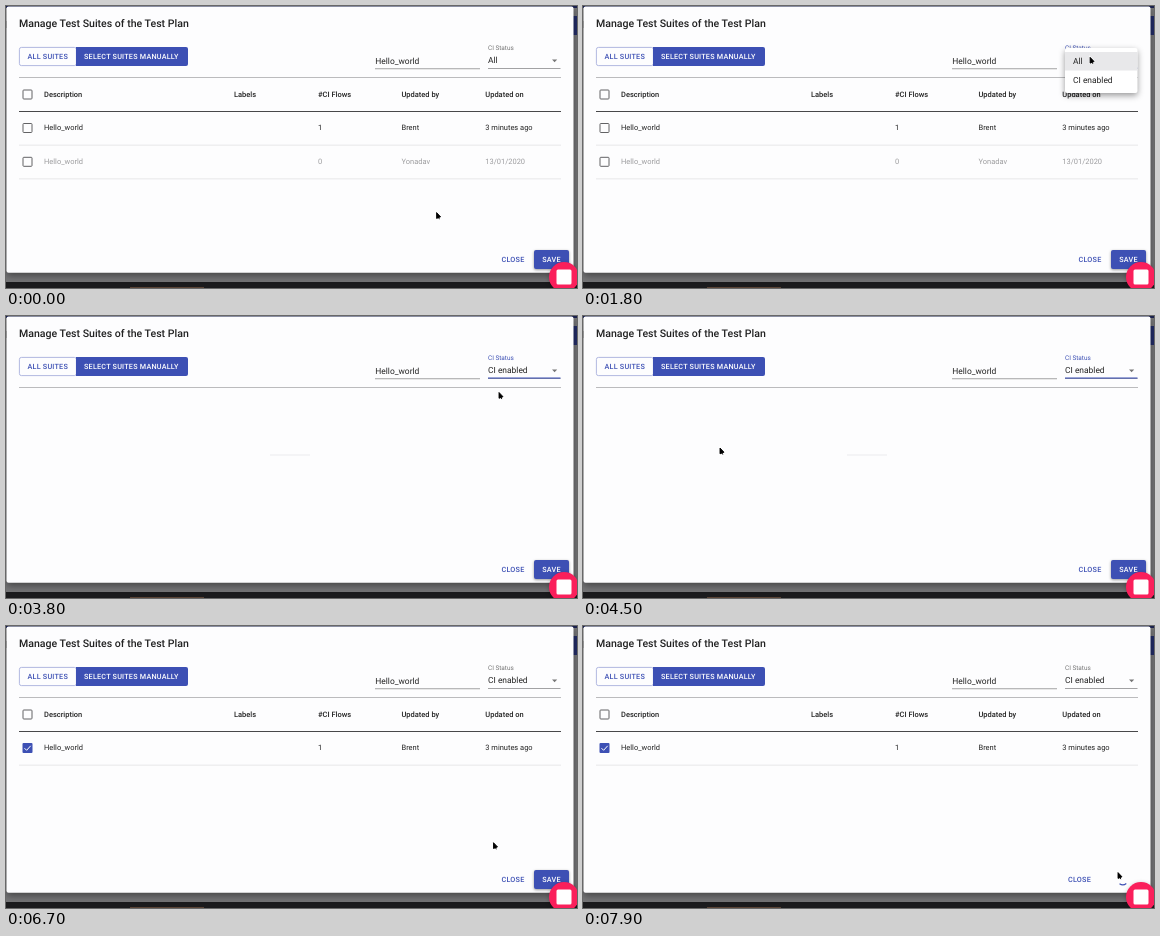
Write an HTML page with a canvas that moves like this. It is 571 px wide and 282 px high and loops after 8000 ms.

```html
<!DOCTYPE html>
<html lang="en">
<head>
<meta charset="utf-8">
<title>Manage Test Suites</title>
<style>
html, body { margin: 0; width: 100%; height: 100%; overflow: hidden; background: #747476; }
canvas { display: block; width: 571px; height: 282px; }
</style>
</head>
<body>
<canvas id="stage"></canvas>
<script>
const W = 571, H = 282, LOOP = 8000, STEP = 100;
const BLUE = '#3d50b4', INK = '#222', GREY = '#757575', RULE = '#8c8c8e', WHITE = '#fdfdfe';
const SMALL = 7.47, BODY = 8.45;

// Moments when the interface reacts
const OPEN = 1600, PICK = 3600, LOAD = 3800, READY = 4600, CHECK = 5900, SUBMIT = 7700;

const HOME = { x: 430.6, y: 206.6 };
const MOVES = [
  { from: 100, to: 900, x: 507, y: 50, hot: true },
  { from: 1700, to: 2400, x: 509, y: 74, hot: true },
  { from: 3700, to: 4500, x: 137, y: 132 },
  { from: 4700, to: 5400, x: 25, y: 122, hot: true },
  { from: 6300, to: 6700, x: 487.5, y: 216.7 },
  { from: 6700, to: 7200, x: 537, y: 249, hot: true },
  { from: 7650, to: SUBMIT, x: 535, y: 246.6 }
];

const COLUMNS = [
  { x: 38, head: 'Description', cells: ['Hello_world', 'Hello_world'] },
  { x: 228, head: 'Labels', cells: ['', ''] },
  { x: 312, head: '#CI Flows', cells: ['1', '0'] },
  { x: 395.5, head: 'Updated by', cells: ['Brent', 'Yonadav'] },
  { x: 479.3, head: 'Updated on', cells: ['3 minutes ago', '13/01/2020'] }
];

const canvas = document.getElementById('stage');
const ctx = canvas.getContext('2d');
const dpr = window.devicePixelRatio || 1;
canvas.width = W * dpr;
canvas.height = H * dpr;
ctx.textRendering = 'geometricPrecision';

const within = (t, a, b) => t >= a && t < b;
const clamp = v => Math.min(1, Math.max(0, v));
const smooth = p => p * p * (3 - 2 * p);

function rect(x, y, w, h, color) {
  ctx.fillStyle = color;
  ctx.fillRect(x, y, w, h);
}

function round(x, y, w, h, r, fill, stroke) {
  ctx.beginPath();
  ctx.roundRect(x, y, w, h, r);
  if (fill) { ctx.fillStyle = fill; ctx.fill(); }
  if (stroke) { ctx.strokeStyle = stroke; ctx.stroke(); }
}

function disc(x, y, r, color) {
  ctx.beginPath();
  ctx.arc(x, y, r, 0, Math.PI * 2);
  ctx.fillStyle = color;
  ctx.fill();
}

function shadowed(blur, dy, alpha, paint) {
  ctx.save();
  ctx.shadowColor = `rgba(0,0,0,${alpha})`;
  ctx.shadowBlur = blur * dpr;
  ctx.shadowOffsetY = dy * dpr;
  paint();
  ctx.restore();
}

function text(str, x, y, size, color = INK, weight = 400, spacing = 0) {
  ctx.font = `${weight} ${size}px Roboto, sans-serif`;
  ctx.letterSpacing = spacing + 'px';
  ctx.fillStyle = color;
  ctx.fillText(str, x, y);
}

const caps = (str, x, y, color) => text(str, x, y, 7.25, color, 500, 0.207);

function page() {
  rect(0, 0, W, H, '#747476');
  rect(0, 0, W, 2, '#1c2350');
  rect(567, 10, 4, 19, '#222c66');
  rect(0, 15, 1, 7, '#333');
  rect(0, 276, W, 6, '#1b1b1d');
  rect(124, 281, 74, 1, '#5a4436');
  shadowed(7, 3, 0.4, () => round(0.5, 0.5, 567, 266.2, 2, WHITE));
}

function toolbar(t) {
  text('Manage Test Suites of the Test Plan', 13, 20.7, 10.55, INK, 500);
  ctx.lineWidth = 0.8;
  round(13.4, 41.4, 57, 18.2, 2, null, '#9fa8da');
  round(70, 41, 112, 19, [0, 2, 2, 0], BLUE);
  caps('ALL SUITES', 21.5, 53.1, BLUE);
  caps('SELECT SUITES MANUALLY', 78, 53.1, '#fff');
  text('Hello_world', 369.3, 57.7, BODY);
  rect(369, 62.4, 105, 0.8, RULE);
  rect(13, 71, 542, 0.9, '#b4b4b6');
}

function select(t) {
  const x = 482, w = 72.5;
  const focus = within(t, OPEN, CHECK);
  const hover = within(t, 900, OPEN);
  text('CI Status', x, 44.3, 6.4, focus ? BLUE : GREY);
  text(t < PICK ? 'All' : 'CI enabled', x, 57.2, BODY);
  ctx.beginPath();
  ctx.moveTo(546, 53.6);
  ctx.lineTo(551.2, 53.6);
  ctx.lineTo(548.6, 56.3);
  ctx.fillStyle = GREY;
  ctx.fill();
  rect(x, 62, w, hover ? 1 : 0.8, hover ? INK : RULE);
  // The focus line shrinks to its middle
  const line = t < OPEN ? 0 : w * clamp(1 - (t - CHECK + STEP) / 147 * (t >= CHECK));
  rect(x + (w - line) / 2, 61.5, line, 1.1, BLUE);
}

function checkbox(y, on) {
  ctx.lineWidth = 1;
  if (!on) return round(17, y - 4.5, 9, 9, 0.8, null, '#626264');
  round(16.5, y - 5, 10, 10, 1, BLUE);
  ctx.beginPath();
  ctx.moveTo(18.5, y + 0.2);
  ctx.lineTo(20.6, y + 2.3);
  ctx.lineTo(24.7, y - 2.2);
  ctx.strokeStyle = '#fff';
  ctx.stroke();
}

function table(t) {
  if (within(t, LOAD, READY)) return rect(264, 138.6, 40, 0.8, '#e6e6e8');
  checkbox(88.5, false);
  rect(13, 105, 542, 1, '#48484a');
  for (const c of COLUMNS) text(c.head, c.x, 91.2, SMALL, INK, 500);
  const rows = t < LOAD ? 2 : 1;
  for (let r = 0; r < rows; r++) {
    const y = 122 + r * 33.8;
    checkbox(y, t > CHECK);
    for (const c of COLUMNS) text(c.cells[r], c.x, y + 2.4, SMALL, r ? '#9c9c9e' : INK);
    rect(13, y + 16.7, 542, 0.8, '#e2e2e4');
  }
}

function menu(t) {
  if (!within(t, OPEN, PICK)) return;
  shadowed(6, 2.5, 0.4, () => round(482, 42, 72.5, 45, 2, '#fff'));
  rect(482, 46, 72.5, 18.5, '#e8e8ea');
  if (t >= 2200) rect(482, 64.5, 72.5, 18.5, '#f4f4f5');
  text('All', 490, 58, BODY);
  text('CI enabled', 490, 76.5, BODY);
}

function saveButton(t) {
  shadowed(3, 1, 0.4, () => round(528, 244, 35, 19, 2, t < 7200 ? BLUE : '#303f9f'));
  caps('SAVE', 536.2, 256, '#fff');
}

function spinner(t) {
  const a = 0.9 + (t - SUBMIT - 200) / 260;
  ctx.beginPath();
  ctx.arc(539.7, 253, 5.8, a, a + 1.25);
  ctx.strokeStyle = BLUE;
  ctx.lineWidth = 1.2;
  ctx.stroke();
}

function footer(t) {
  const busy = t >= SUBMIT;
  caps('CLOSE', busy ? 485 : 495.5, 256, BLUE);
  (busy ? spinner : saveButton)(t);
  shadowed(4, 1, 0.25, () => disc(558, 271, 15, '#fa1f5b'));
  round(550.5, 263.5, 15, 15, 1.5, '#fff');
}

function hand() {
  const shape = grow => {
    ctx.beginPath();
    ctx.roundRect(-0.6 - grow, -grow, 1.2 + 2 * grow, 5 + 2 * grow, 0.7);
    ctx.roundRect(-1.8 - grow, 3.2 - grow, 5 + 2 * grow, 4 + 2 * grow, 1.3);
    ctx.fill();
  };
  ctx.fillStyle = '#222';
  shape(0.7);
  ctx.fillStyle = '#fff';
  shape(0);
}

function arrow() {
  ctx.beginPath();
  ctx.moveTo(0, 0);
  ctx.lineTo(0, 5.8);
  ctx.lineTo(4, 4.2);
  ctx.closePath();
  ctx.moveTo(1.5, 3.8);
  ctx.lineTo(2.8, 6.6);
  ctx.lineWidth = 1.6;
  ctx.strokeStyle = '#fff';
  ctx.stroke();
  ctx.lineWidth = 0.9;
  ctx.strokeStyle = '#000';
  ctx.stroke();
  ctx.fillStyle = '#000';
  ctx.fill();
}

function pointer(t) {
  let { x, y } = HOME, hot = false;
  for (const m of MOVES) {
    if (t <= m.from) break;
    const e = smooth(clamp((t - m.from) / (m.to - m.from)));
    x += (m.x - x) * e;
    y += (m.y - y) * e;
    hot = m.hot && t > m.to && t !== PICK;
  }
  ctx.save();
  ctx.translate(x, y);
  (hot ? hand : arrow)();
  ctx.restore();
}

function draw(now) {
  const t = Math.floor((now % LOOP) / STEP) * STEP;
  ctx.setTransform(dpr, 0, 0, dpr, 0, 0);
  for (const layer of [page, toolbar, select, table, menu, footer, pointer]) layer(t);
}

const start = performance.now();
function tick() {
  draw(performance.now() - start);
  requestAnimationFrame(tick);
}
tick();
</script>
</body>
</html>
```
